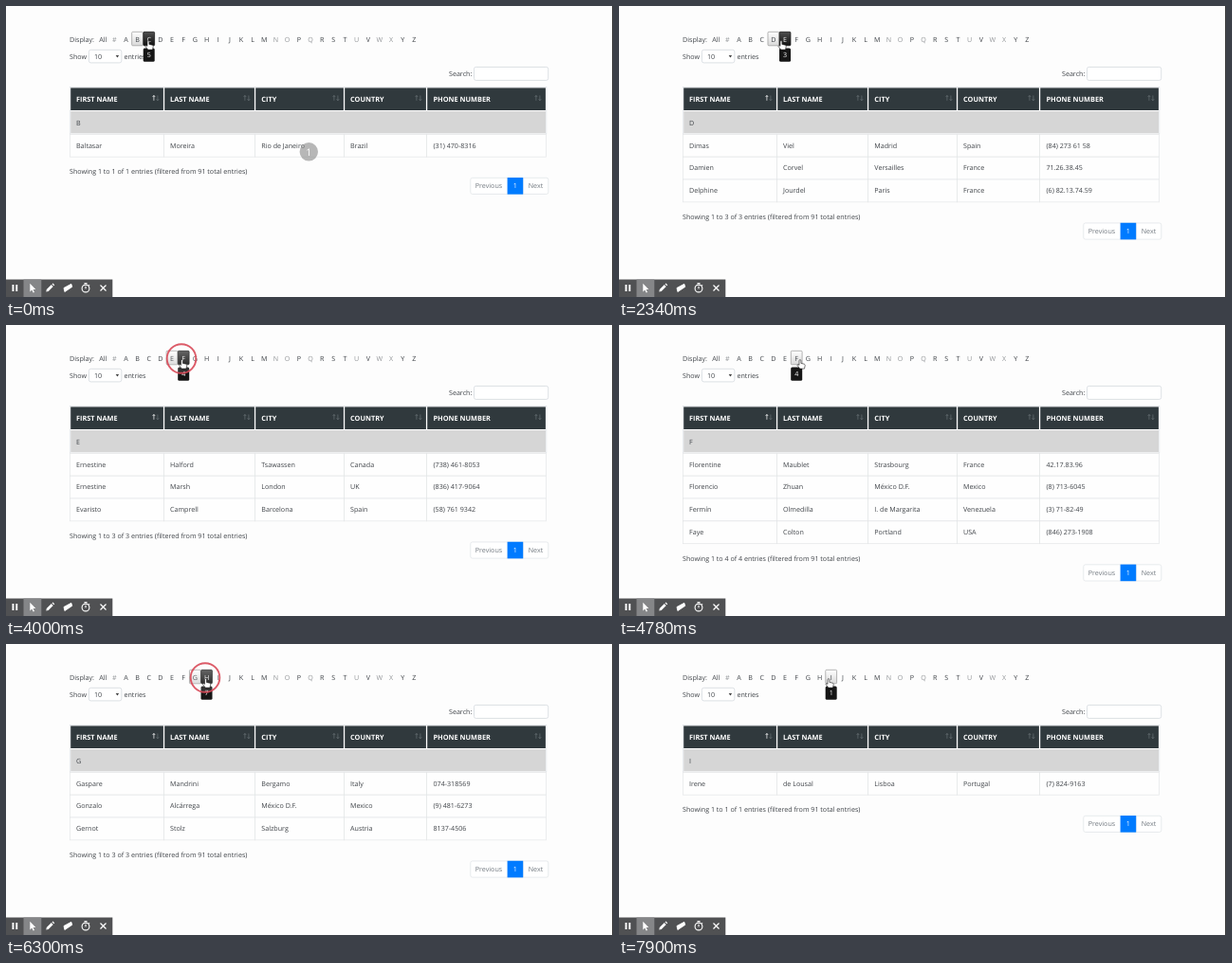
These frames come from a looping animation (640x307 px, 8000 ms). An HTML page:

```html
<!DOCTYPE html>
<html lang="en">
<head>
<meta charset="utf-8">
<title>Alphabet filter</title>
<style>
  html, body { margin: 0; width: 100%; height: 100%; overflow: hidden; background: #fdfdfd; }
  svg { display: block; width: 640px; height: 307px; }
  text { font-family: "Open Sans", "Noto Sans", sans-serif; font-size: 7.13px; fill: #3f4348; text-rendering: geometricPrecision; }
  .mid { text-anchor: middle; }
  .off { fill: #94979a; }
  .inv { fill: #fff; }
  .head { font-size: 7.35px; font-weight: 700; fill: #fff; }
  .muted { fill: #737a81; }
</style>
</head>
<body>
<svg viewBox="0 0 640 307" xmlns="http://www.w3.org/2000/svg">
  <defs>
    <linearGradient id="light" x2="0" y2="1"><stop stop-color="#fff"/><stop offset="1" stop-color="#d9d9d9"/></linearGradient>
    <linearGradient id="dark" x2="0" y2="1"><stop stop-color="#505050"/><stop offset="1" stop-color="#111"/></linearGradient>
  </defs>
  <rect width="640" height="307" fill="#fdfdfd"/>
  <g id="page"></g>
  <g id="overlay"></g>
  <g id="tools"></g>
  <rect x="639" width="1" height="307" fill="#3c3c3c"/>
</svg>
<script>
const LOOP = 8000, ROW = 23.85;
const EDGES = [67.5, 166.5, 262.5, 356.5, 443.5, 569.5];
const HEADS = ['FIRST NAME', 'LAST NAME', 'CITY', 'COUNTRY', 'PHONE NUMBER'];
const COLS = [74, 173, 269.3, 363, 450.5];

const PEOPLE = {
  B: ['Baltasar|Moreira|Rio de Janeiro|Brazil|(31) 470-8316'],
  C: ['Cornelia|Sandvall|Luleå|Sweden|0846-73 58 19',
      'Colette|Lambrey|Nantes|France|73.58.46.09',
      'Camilo|Valdebrán|San Cristóbal|Venezuela|(7) 418-2967',
      'Camilo|Quintral|Barquisimeto|Venezuela|(4) 782-5036',
      'Charlotte|Maeyl|Bruxelles|Belgium|(06) 738 51 92'],
  D: ['Dimas|Viel|Madrid|Spain|(84) 273 61 58',
      'Damien|Corvel|Versailles|France|71.26.38.45',
      'Delphine|Jourdel|Paris|France|(6) 82.13.74.59'],
  E: ['Ernestine|Halford|Tsawassen|Canada|(738) 461-8053',
      'Ernestine|Marsh|London|UK|(836) 417-9064',
      'Evaristo|Camprell|Barcelona|Spain|(58) 761 9342'],
  F: ['Florentine|Maublet|Strasbourg|France|42.17.83.96',
      'Florencio|Zhuan|México D.F.|Mexico|(8) 713-6045',
      'Fermín|Olmedilla|I. de Margarita|Venezuela|(3) 71-82-49',
      'Faye|Colton|Portland|USA|(846) 273-1908'],
  G: ['Gaspare|Mandrini|Bergamo|Italy|074-318569',
      'Gonzalo|Alcárrega|México D.F.|Mexico|(9) 481-6273',
      'Gernot|Stolz|Salzburg|Austria|8137-4506'],
  H: ['Hedwig|Lahn|Mannheim|Germany|0837-61942',
      'Harvey|Stroud|Eugene|USA|(738) 264-9175',
      'Hitesh|Varan|London|UK|(492) 836-7150',
      'Hubert|Karsay|Albuquerque|USA|(631) 748-2096',
      'Hazel|Marlowe|Cowes|UK|(274) 961-8305',
      'Heidrun|Falkenau|Köln|Germany|0473-816295',
      'Helmut|Brandel|Cunewalde|Germany|0816-374925'],
  I: ['Irene|de Lousal|Lisboa|Portugal|(7) 824-9163']
};

// start ms, shown page, hovered letter, pointer x, ring strength
const STEPS = [
  [0, 'B', 'C', 150, 0], [100, 'B', 'C', 150, .6], [130, 'B', 'C', 150, 1],
  [680, 'C', 'C', 150, 1], [880, 'C', 'C', 150, 0], [1400, 'C', 'D', 162, 0],
  [1820, 'C', 'D', 162, 1], [1990, 'D', 'D', 162, 1], [2160, 'D', 'D', 162, 0],
  [2340, 'D', 'E', 171, 0], [2500, 'D', 'E', 173, 0], [2810, 'D', 'E', 173, 1],
  [3110, 'E', 'E', 173, 1], [3290, 'E', 'E', 173, 0], [3650, 'E', 'F', 183, 0],
  [3820, 'E', 'F', 185, .6], [4000, 'E', 'F', 185.5, 1],
  [4320, 'F', 'F', 185.5, 1], [4480, 'F', 'F', 185.5, 0], [4780, 'F', 'F', 191, 0],
  [4920, 'F', 'G', 197, 0], [5100, 'F', 'G', 198, .6], [5260, 'F', 'G', 198, 1],
  [5560, 'G', 'G', 198, 1], [5730, 'G', 'G', 198, 0], [5890, 'G', 'H', 210, 0],
  [6160, 'G', 'H', 210.5, .6], [6300, 'G', 'H', 210.5, 1],
  [6610, 'H', 'H', 210.5, 1], [6840, 'H', 'H', 210.5, 0],
  [7140, 'H', 'I', 220.5, 0], [7260, 'H', 'I', 220.5, 1],
  [7700, 'I', 'I', 221, 1], [7900, 'I', 'I', 221, 0]
];

const $ = id => document.getElementById(id);
// y is the middle of the capitals
const text = (x, y, s, cls = '') => `<text x="${x}" y="${y + 2.55}" class="${cls}">${s}</text>`;
const box = (x, y, w, h, fill, stroke = 'none', r = 0) =>
  `<rect x="${x}" y="${y}" width="${w}" height="${h}" rx="${r}" fill="${fill}" stroke="${stroke}" stroke-width=".7"/>`;
const path = (d, fill, stroke = 'none', w = 1) =>
  `<path d="${d}" fill="${fill}" stroke="${stroke}" stroke-width="${w}" stroke-linejoin="round"/>`;
const letterX = c => 126.4 + (c.charCodeAt(0) - 65) * 12.16;

function letters(page, hover) {
  let s = text(67, 35, 'Display:') + text(102.2, 35, 'All', 'mid') + text(114.3, 35, '#', 'mid off');
  for (const c of 'ABCDEFGHIJKLMNOPQRSTUVWXYZ') {
    const x = letterX(c), lit = c === hover && c !== page;
    if (c === page) s += box(x - 5.9, 27.3, 11.8, 14.5, 'url(#light)', '#979797', 1);
    if (lit) s += box(x - 5.9, 27.3, 11.8, 14.5, 'url(#dark)', '#111', 1);
    s += text(x, 35, c, 'mid' + (lit ? ' inv' : 'NOQUWX'.includes(c) ? ' off' : ''));
  }
  return s;
}

function tip(c) {
  const x = letterX(c);
  return box(x - 6, 44.5, 12, 14.2, '#161616', 'none', 1.5) + text(x, 51.7, PEOPLE[c].length, 'mid inv');
}

function controls() {
  return text(67, 53, 'Show') + box(87.4, 46.3, 34.4, 13.6, '#fff', '#ced4da', 2) +
    text(93, 53, '10') + path('M115.7 52h3.4l-1.7 2.4z', '#444') + text(124.5, 53, 'entries') +
    text(467, 71.5, 'Search:') + box(493.5, 64.4, 78.2, 14, '#fff', '#ced4da', 2);
}

function header() {
  let s = box(67.3, 85.5, 502.5, 49.5, '#fff', '#dee2e6');
  HEADS.forEach((h, i) => {
    const l = EDGES[i] + .7, r = EDGES[i + 1] - .6, x = r - 10;
    s += box(l, 86.4, r - l, 23.6, '#30393d') + text(COLS[i], 98.3, h, 'head');
    s += path(`M${x} 99.8v-5.4m-1.3 1.6l1.3-1.6l1.3 1.6`, 'none', i ? '#697176' : '#fff', .7);
    s += path(`M${x + 4} 94.4v5.4m-1.3-1.6l1.3 1.6l1.3-1.6`, 'none', '#697176', .7);
  });
  return s;
}

function rows(page) {
  let s = box(68.2, 111, 500.8, 23.2, '#d6d6d6') + text(74, 123, page);
  PEOPLE[page].forEach((line, n) => {
    const y = 135.3 + n * ROW;
    line.split('|').forEach((v, i) => {
      s += box(EDGES[i], y, EDGES[i + 1] - EDGES[i], ROW, '#fefefe', '#e3e5e7') + text(COLS[i], y + 11.7, v);
    });
  });
  return s;
}

function footer(n) {
  const y = 150.6 + n * ROW, p = y + 6.8;
  return text(67, y, `Showing 1 to ${n} of ${n} entries (filtered from 91 total entries)`) +
    box(489.8, p, 82, 17.2, '#fff', '#dee2e6', 2) + path(`M545.2 ${p}v17.2`, 'none', '#dee2e6', .7) +
    box(528.6, p - .2, 16.6, 17.6, '#007bff') +
    text(509, p + 8.6, 'Previous', 'mid muted') + text(536.9, p + 8.6, '1', 'mid inv') +
    text(558.5, p + 8.6, 'Next', 'mid muted');
}

const scrollbar = () => box(631, 0, 8, 307, '#f1f1f1') + box(632, 8, 6, 276, '#c1c1c1') +
  path('M633 5l2-2.4l2 2.4z', '#505050') + path('M633 302l2 2.4l2-2.4z', '#505050');

const hand = x => `<g transform="translate(${x} 36.5)">` +
  path('M-1 .7q1-1.4 1.9 0v3.2l3.4.8q1 .4.9 1.5l-.7 3.4h-4.8l-2.6-3.5q-.1-1.2 1-.9l.9.7z', '#fff', '#222', .6) + '</g>';

const ring = (x, k) =>
  `<circle cx="${x}" cy="35.5" r="${8 + 7.3 * k}" fill="#fff" fill-opacity=".12" stroke="#d94a58" stroke-opacity="${k * .9}" stroke-width="1.9"/>`;

function tools() {
  const w = '#fff';
  return box(0, 288.5, 112.3, 18.5, '#505153') + box(18.5, 288.5, 18.8, 18.5, '#858688') +
    box(6.5, 294, 1.9, 7, w) + box(10.3, 294, 1.9, 7, w) +
    path('M25.3 292.8v8.6l2-1.8l1.4 3l1.3-.6l-1.4-2.9h2.7z', w) +
    path('M42.3 301.4l.5-2.4l5-5l1.9 1.9l-5 5zM48.5 293.3l.9-.8l1.8 1.8l-.8.9z', w) +
    path('M61 297.5l7.8-4.2l.9 3l-7.8 5.2z', w, w, .9) +
    `<circle cx="84" cy="298" r="3.9" fill="none" stroke="${w}" stroke-width="1.1"/>` +
    path('M82.5 292.6h3M84 295.8v2.4M87.2 294.4l.9.8', 'none', w, 1.1) +
    path('M99.5 294.5l6 6m0-6l-6 6', 'none', w, 1.2);
}

const badge = () => '<circle cx="319.3" cy="153.8" r="9.7" fill="#8a8a8a" fill-opacity=".62"/>' +
  '<text x="319.3" y="157.6" class="mid inv" style="font-size:10.5px">1</text>';

let shown = -1;
function draw(t) {
  let i = STEPS.length - 1;
  while (STEPS[i][0] > t) i--;
  if (i === shown) return;
  shown = i;
  const [, page, hover, x, k] = STEPS[i];
  const tall = page === 'H';
  // the scrollbar narrows the page, so the centred content moves left
  $('page').setAttribute('transform', `translate(${tall ? -4 : 0} 0)`);
  $('page').innerHTML = controls() + letters(page, hover) + header() + rows(page) +
    footer(PEOPLE[page].length) + tip(hover);
  $('overlay').innerHTML = (tall ? scrollbar() : '') + (i ? '' : badge()) + (k ? ring(x - .5, k) : '') + hand(x);
}

$('tools').innerHTML = tools();
function tick() {
  draw(performance.now() % LOOP);
  requestAnimationFrame(tick);
}
tick();
</script>
</body>
</html>
```
